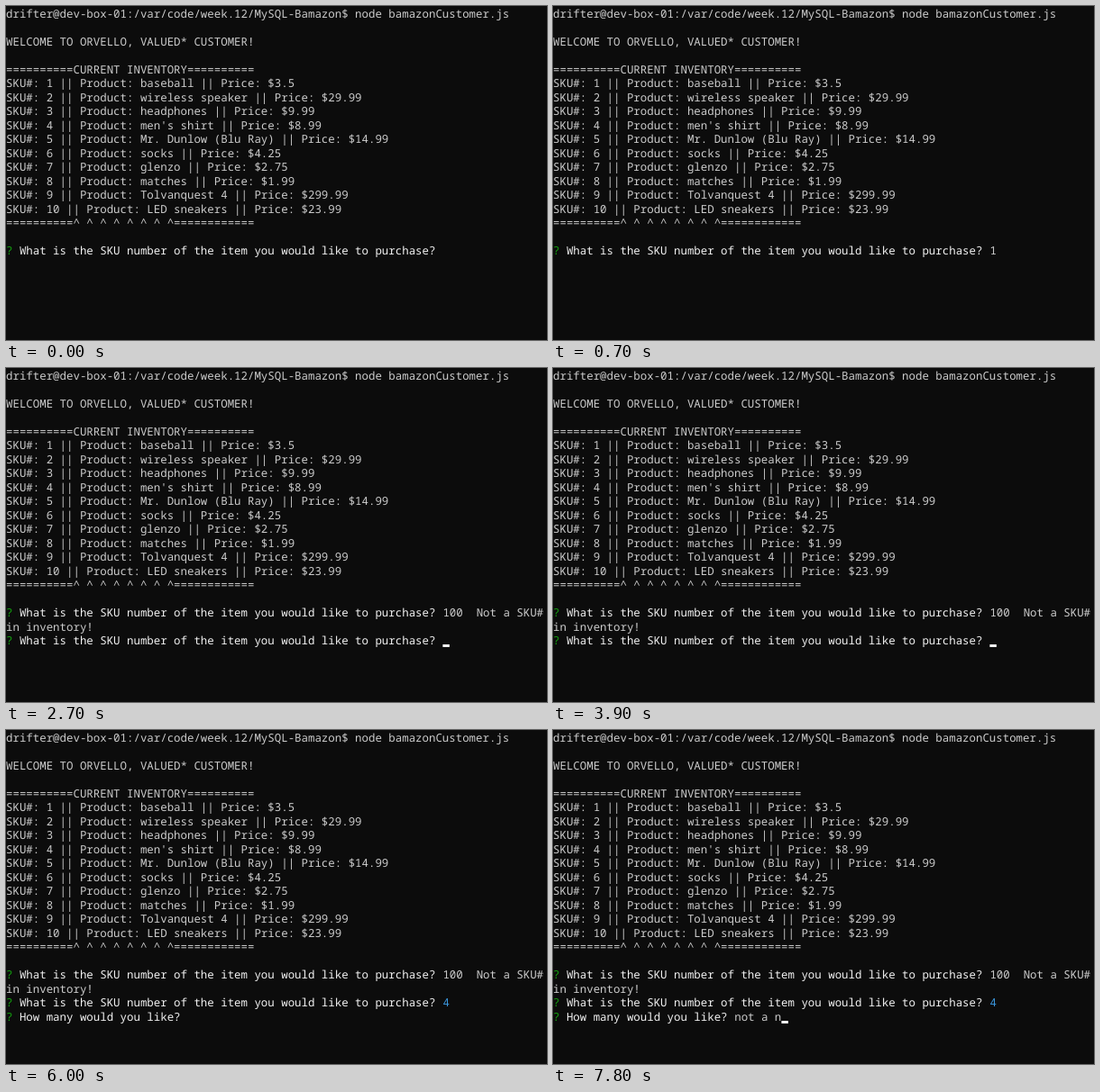
Write an HTML page that moves like this. It is 600x371 px and loops after 8 s.

```html
<!DOCTYPE html>
<html lang="en">
<head>
<meta charset="utf-8">
<title>Terminal shop</title>
<style>
html, body { margin: 0; width: 100%; height: 100%; overflow: hidden; background: #0c0c0c; }
svg { display: block; width: 600px; height: 371px; }
text {
  font: 12.42px "Noto Sans Mono", "DejaVu Sans Mono", monospace;
  fill: #ccc;
  white-space: pre;
  text-rendering: geometricPrecision;
  font-variant-ligatures: none;
}
.bright { fill: #f2f2f2; }
.mark { fill: #13a10e; }
.answer { fill: #3a96dd; }
</style>
</head>
<body>
<svg id="screen" viewBox="0 0 600 371">
  <rect width="600" height="371" fill="#0c0c0c"/>
</svg>
<script>
const LOOP = 8000, COL = 7.452, ROW = 15.48, BASE = 13;
const screen = document.getElementById('screen');

function add(tag, attrs) {
  const node = document.createElementNS('http://www.w3.org/2000/svg', tag);
  for (const key in attrs) node.setAttribute(key, attrs[key]);
  return screen.appendChild(node);
}

function write(row, col, str, cls = '') {
  const node = add('text', { x: col * COL, y: BASE + row * ROW, class: cls });
  node.textContent = str;
  return node;
}

const show = (node, on) => node.setAttribute('visibility', on ? 'visible' : 'hidden');

const prompt = (row, str) => [write(row, 0, '?', 'mark'), write(row, 2, str, 'bright')];

const items = [
  ['baseball', '3.5'],
  ['wireless speaker', '29.99'],
  ['headphones', '9.99'],
  ["men's shirt", '8.99'],
  ['Mr. Dunlow (Blu Ray)', '14.99'],
  ['socks', '4.25'],
  ['glenzo', '2.75'],
  ['matches', '1.99'],
  ['Tolvanquest 4', '299.99'],
  ['LED sneakers', '23.99']
];
const bar = '='.repeat(10);
const ask = 'What is the SKU number of the item you would like to purchase?';

write(0, 0, 'drifter@dev-box-01:/var/code/week.12/MySQL-Bamazon$ node bamazonCustomer.js');
write(2, 0, 'WELCOME TO ORVELLO, VALUED* CUSTOMER!');
write(4, 0, bar + 'CURRENT INVENTORY' + bar);
items.forEach(([name, price], i) =>
  write(5 + i, 0, `SKU#: ${i + 1} || Product: ${name} || Price: $${price}`));
write(15, 0, bar + '^ ^ ^ ^ ^ ^ ^ ^' + bar + '==');
prompt(17, ask);

// Parts that appear after each Enter
const RETRY = 1700, PICKED = 4700;
const retry = [write(17, 70, 'Not a SKU#'), write(18, 0, 'in inventory!'), ...prompt(19, ask)];
const amount = prompt(20, 'How many would you like?');

// Typed fields: one time per key
const fields = [
  { row: 17, col: 65, str: '100', keys: [700, 1100, 1300] },
  { row: 19, col: 65, str: '4', keys: [4300] },
  { row: 20, col: 27, str: 'not a n', keys: [7000, 7100, 7200, 7300, 7500, 7600, 7800] }
];
for (const f of fields) f.node = write(f.row, f.col, '');

const cursor = add('rect', { width: 7.5, height: 3, fill: '#f2f2f2' });
const blinks = [[100, 600], [1100, 1600], [1700, 2300], [2700, 3300], [3800, 4300],
  [4700, 4900], [5400, 6000], [6500, LOOP]];

function draw(t) {
  for (const node of retry) show(node, t >= RETRY);
  for (const node of amount) show(node, t >= PICKED);
  for (const f of fields) {
    f.count = f.keys.filter(k => k <= t).length;
    f.node.textContent = f.str.slice(0, f.count);
  }
  fields[1].node.setAttribute('class', t >= PICKED ? 'answer' : '');

  const f = fields[t < RETRY ? 0 : t < PICKED ? 1 : 2];
  cursor.setAttribute('x', (f.col + f.count) * COL);
  cursor.setAttribute('y', Math.round(BASE + f.row * ROW));
  show(cursor, blinks.some(([on, off]) => t >= on && t < off));
}

const start = performance.now();
function tick(now) {
  draw(Math.max(0, now - start) % LOOP);
  requestAnimationFrame(tick);
}
draw(0);
requestAnimationFrame(tick);
</script>
</body>
</html>
```
